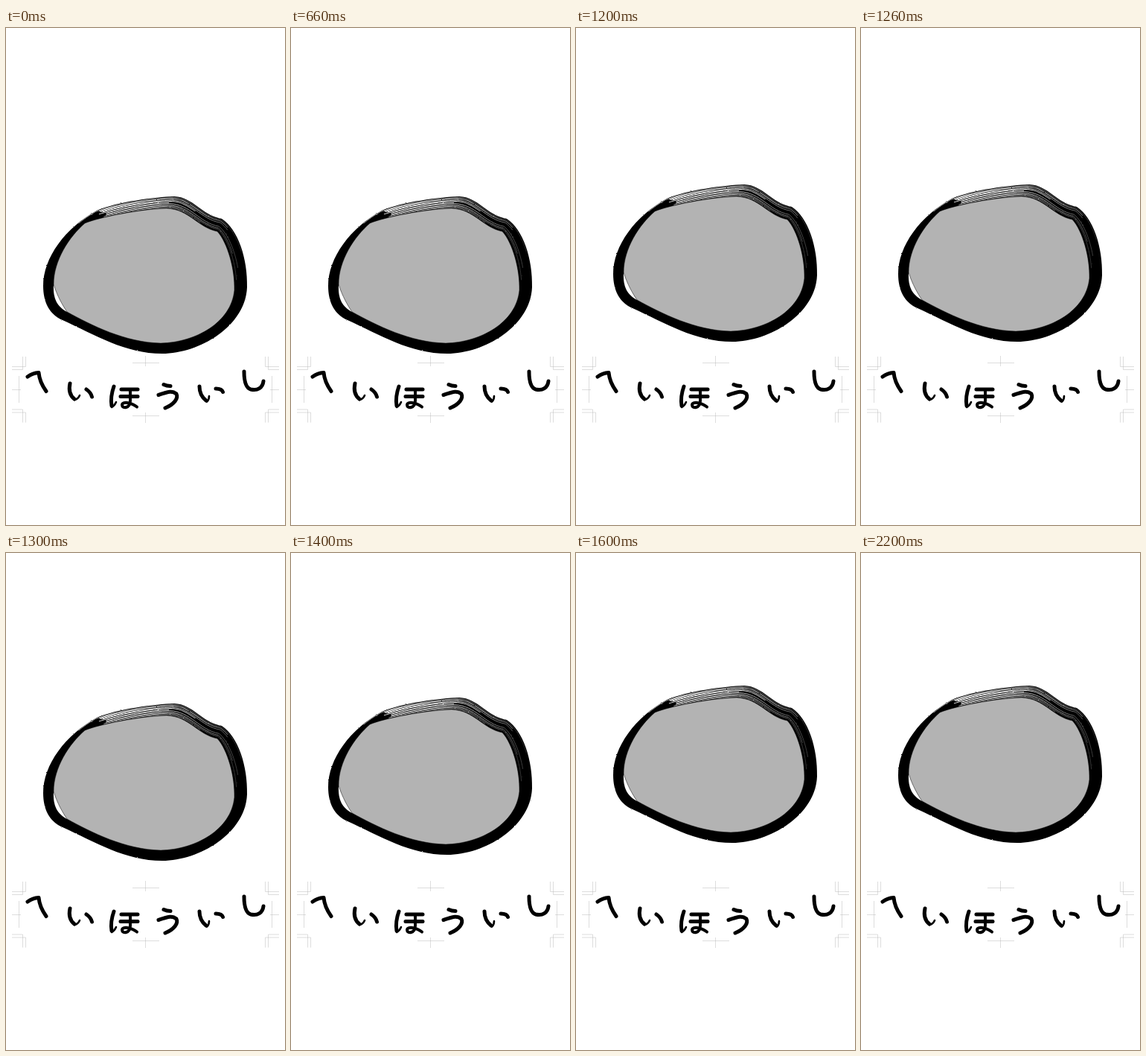
An HTML page for the animation above (2600 ms loop, 375 by 667 pixels).

```html
<!DOCTYPE html>
<html lang="ja">
<head>
<meta charset="utf-8">
<title>へいほういし</title>
<style>
  html, body { margin: 0; width: 100%; height: 100%; overflow: hidden; background: #fff; }
  svg { display: block; width: 100%; height: 100%; }
  #marks { fill: none; stroke: #bbb; stroke-width: .5; }
  #strands { fill: none; stroke: url(#fade); }
  #letters { fill: none; stroke: #000; stroke-width: 5; stroke-linecap: round; stroke-linejoin: round; }
  #letters .thin { stroke-width: 2.6; }
</style>
</head>
<body>
<svg viewBox="0 0 375 667" role="img" aria-label="へいほういし">
  <defs>
    <filter id="rough" x="-5%" y="-5%" width="110%" height="110%" color-interpolation-filters="sRGB">
      <feTurbulence type="fractalNoise" baseFrequency=".5" numOctaves="2" seed="4"/>
      <feDisplacementMap in="SourceGraphic" scale="2" xChannelSelector="R" yChannelSelector="G"/>
    </filter>
    <linearGradient id="fade" gradientUnits="userSpaceOnUse" x1="200" x2="310">
      <stop stop-color="#fff"/><stop offset="1" stop-color="#444"/>
    </linearGradient>
    <path id="corner" d="M22.5 441V458.5H8M26.5 441V454.5H8"/>
  </defs>

  <g id="stone">
    <g filter="url(#rough)">
      <path id="ring" d="M50 346C50 308 80 268 122 245C150 233 200 227 226 226C252 227 262 251 290 256
        C312 270 325 310 324 348C322 400 260 437 210 437C160 437 120 412 76 392C58 384 50 368 50 346Z"/>
      <g id="strands"></g>
    </g>
    <path fill="#fff" d="M64 344C63 364 69 374 82 381L90 360Z"/>
    <path id="face" fill="#b3b3b3" stroke="#000" stroke-width=".5"
      d="M64 344C64 312 85 280 106 262C125 254 180 243 216 242C246 243 258 268 284 273
        C298 288 308 325 307 352C303 395 255 422 208 423C160 422 115 399 82 381C76 372 69 360 64 344Z"/>
  </g>

  <g id="marks">
    <use href="#corner"/>
    <use href="#corner" transform="matrix(-1 0 0 1 375 0)"/>
    <use href="#corner" transform="matrix(1 0 0 -1 0 970.5)"/>
    <use href="#corner" transform="matrix(-1 0 0 -1 375 970.5)"/>
    <path d="M170 449.500H206M187.500 440V454M170 520.500H206M187.500 516V530
      M17.500 467V503M8 485.500H20M357.500 467V503M355 485.500H367"/>
  </g>

  <g id="letters">
    <path d="M29 468Q36 463 44 462.500Q45 475 54 487.500"/>
    <path d="M86 477Q83 491 92 498M108 485Q114 489 115.500 495"/>
    <path class="thin" d="M92 499Q97 498 99 493"/>
    <path d="M145 481Q140 495 142 507M155 485H177M154 494.500H177"/>
    <path d="M167 485V500C167 511 156 511 156 506C156 501 168 502 176 508.500" stroke-width="4"/>
    <path class="thin" d="M142 509Q146 507 148 502"/>
    <path d="M212 478.500Q216 480.500 221 480.500M205 492.500C214 490 222 485 229 491C232 497 226 505 214 510"/>
    <path d="M260 481Q260 493 269 500M282 484Q290 484 291.500 488.500"/>
    <path class="thin" d="M270 501.500Q273 499 273 494"/>
    <path d="M320 461C320 474 322 483 329 485C338 487 345 483 346 474"/>
  </g>
</svg>
<script>
const $ = id => document.getElementById(id);

// Seeded generator, so the brush looks the same on every load.
let seed = 7;
const random = () => (seed = seed * 16807 % 2147483647) / 2147483647;

// Blends two outlines that share the same sequence of commands.
function blend(from, to, t) {
  const goal = to.match(/\d+/g);
  let i = 0;
  return from.replace(/\d+/g, n => +n + (goal[i++] - n) * t);
}

// Dry-brush gaps run inside the band, from the upper left over the shoulder.
const outer = $('ring').getAttribute('d'), inner = $('face').getAttribute('d');
const STRANDS = 9;
for (let i = 0; i < STRANDS; i++) {
  const strand = document.createElementNS('http://www.w3.org/2000/svg', 'path');
  const start = 13 + random() * 6, length = 12 + random() * 24;
  strand.setAttribute('d', blend(outer, inner, (i + .7 + random() * .4) / (STRANDS + .5)));
  strand.setAttribute('pathLength', 100);
  strand.setAttribute('stroke-dasharray', `0 ${start} ${length} 100`);
  strand.setAttribute('stroke-width', .4 + random() * .9);
  $('strands').append(strand);
}

// The stone waits, climbs in six hard steps, then rests before the loop.
const LOOP = 2600, FIRST = 1100, STEP = 100, RISE = 8, STEPS = 6;
const pose = (time, step) => ({
  offset: time / LOOP,
  transform: `translateY(${-RISE * step}px)`,
  easing: 'step-end'
});
const climb = Array.from({ length: STEPS }, (_, i) => pose(FIRST + i * STEP, i + 1));
$('stone').animate([pose(0, 0), ...climb, pose(LOOP, STEPS)], { duration: LOOP, iterations: Infinity });
</script>
</body>
</html>
```
